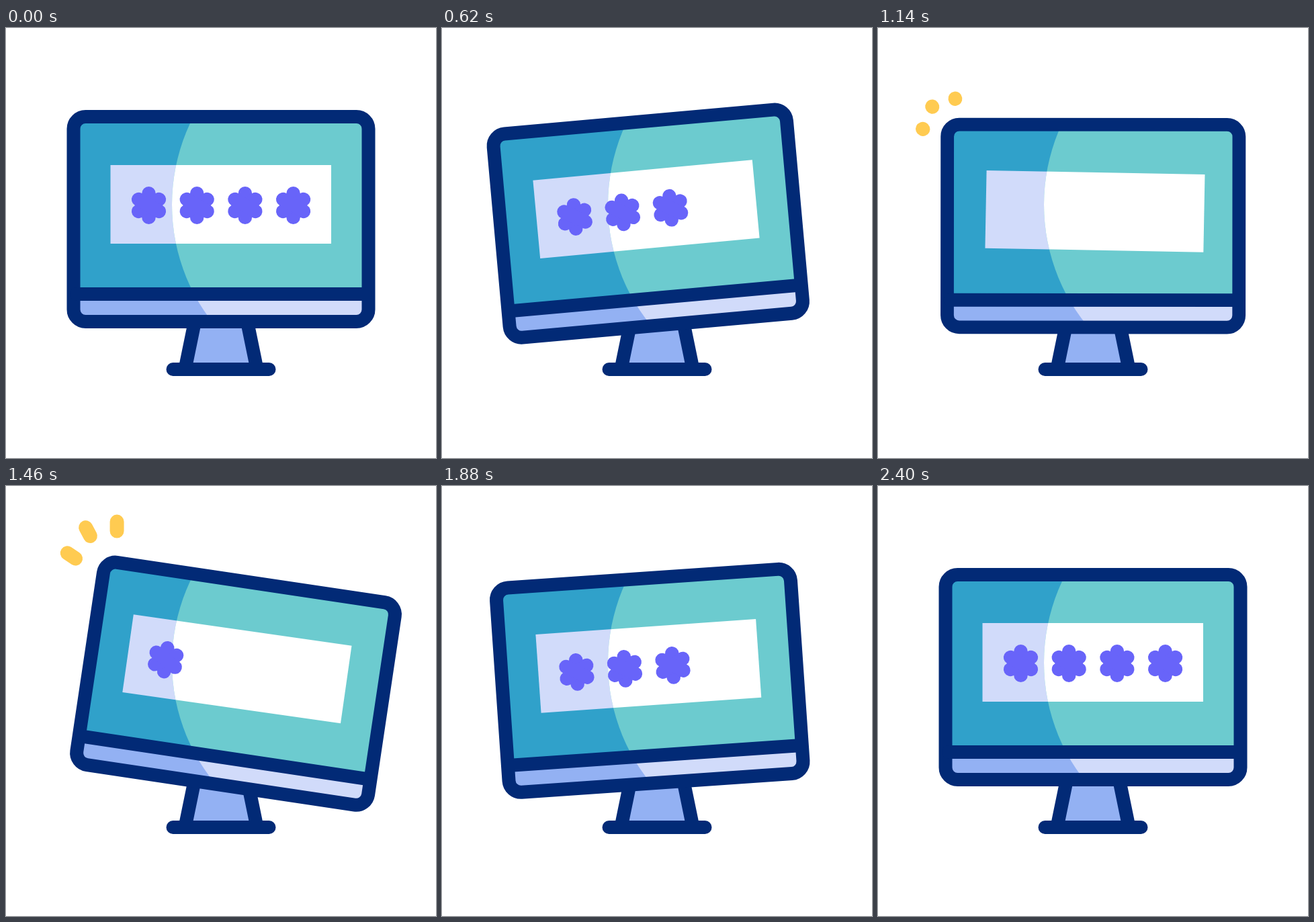
Recreate the animation shown at these times as an HTML page with a canvas. Size 640x640 px, loop 3000 ms.

```html
<!DOCTYPE html>
<html lang="en">
<head>
<meta charset="utf-8">
<title>Password monitor</title>
<style>
  html, body { margin: 0; width: 100%; height: 100%; overflow: hidden; background: #fff; }
  canvas { display: block; width: 640px; height: 640px; }
</style>
</head>
<body>
<canvas id="stage" width="640" height="640"></canvas>
<script>
const ctx = document.getElementById('stage').getContext('2d');
const LOOP = 3000, STEP = 20;
const NAVY = '#022a76', VIOLET = '#6864f9', YELLOW = '#ffcb51', STAND = '#93b1f3';
const SHADED = { screen: '#30a1ca', strip: '#93b1f3', field: '#d1dbfa' };
const LIT = { screen: '#6ccbcf', strip: '#d1dbfa', field: '#ffffff' };

// Poses of the monitor: time, tilt in degrees, centre
const POSES = [
  [200, 0, 320, 284.5],
  [900, -7.9, 299.6, 294.8],
  [1400, 9, 343.4, 294.4],
  [1900, -4, 309.1, 289.8],
  [2400, 0, 320, 284.5]
];
const HIDE_TIMES = [500, 650, 800, 950];
const SHOW_TIMES = [1400, 1600, 1800, 2000];

// Sparks: start point and outward vector, relative to the monitor's centre
const SPARKS = [
  [-256, -145.5, -21.6, -10.2],
  [-242, -179, -13.9, -18.7],
  [-207.6, -191, -3.3, -22.2]
];

const ease = (t, from, to) => {
  const p = Math.min(1, Math.max(0, (t - from) / (to - from)));
  return p * p * (3 - 2 * p);
};

// Points travel in straight lines between poses, so blend the matrices.
// The field reaches each pose slightly before the monitor (lead).
function poseAt(t, lead) {
  const matrix = ([, angle, x, y]) => {
    const a = angle * Math.PI / 180, c = Math.cos(a), s = Math.sin(a);
    return [c, s, -s, c, x, y];
  };
  const time = i => POSES[i][0] - (i ? lead : 0);
  let i = 0;
  while (i < POSES.length - 2 && t >= time(i + 1)) i++;
  const u = ease(t, time(i), time(i + 1));
  const next = matrix(POSES[i + 1]);
  return matrix(POSES[i]).map((v, k) => v + (next[k] - v) * u);
}

function withPose(pose, draw) {
  ctx.save();
  ctx.transform(...pose);
  draw();
  ctx.restore();
}

function fillRect(color, x, y, w, h) {
  ctx.fillStyle = color;
  ctx.fillRect(x, y, w, h);
}

function line(color, width, ...points) {
  ctx.strokeStyle = color;
  ctx.lineWidth = width;
  ctx.beginPath();
  for (let i = 0; i < points.length; i += 2) ctx.lineTo(points[i], points[i + 1]);
  ctx.stroke();
}

function drawStand() {
  ctx.fillStyle = STAND;
  ctx.beginPath();
  for (const [x, y] of [[281, 437], [359, 437], [373.6, 508], [266.4, 508]]) ctx.lineTo(x, y);
  ctx.fill();
  line(NAVY, 20, 266.4, 508, 281, 437, 359, 437, 373.6, 508);
  line(NAVY, 20, 248.5, 508, 391.5, 508);
}

function drawPanels(colors, body, field) {
  withPose(body, () => {
    fillRect(colors.screen, -215, -148, 430, 262);
    fillRect(colors.strip, -215, 112, 430, 36);
  });
  withPose(field, () => fillRect(colors.field, -164.5, -80.5, 328.5, 117));
}

function drawFrame() {
  ctx.strokeStyle = NAVY;
  ctx.lineWidth = 20;
  ctx.beginPath();
  ctx.roundRect(-219.5, -152.5, 439, 305, 18);
  ctx.stroke();
  line(NAVY, 20, -215, 111.5, 215, 111.5);
}

function drawAsterisk(x, y) {
  for (let k = 0; k < 3; k++) {
    const a = Math.PI / 2 + k * Math.PI / 3;
    const dx = 17.7 * Math.cos(a), dy = 17.7 * Math.sin(a);
    line(VIOLET, 20.6, x - dx, y - dy, x + dx, y + dy);
  }
}

function drawSparks(t) {
  const head = ease(t, 1100, 1500), tail = ease(t, 1300, 1700);
  if (head <= tail) return;
  for (const [x, y, dx, dy] of SPARKS) {
    line(YELLOW, 21, x + dx * tail, y + dy * tail, x + dx * head, y + dy * head);
  }
}

function render(t) {
  const body = poseAt(t, 0), field = poseAt(t, 20);
  const passed = times => times.filter(time => t >= time).length;
  const count = 4 - passed(HIDE_TIMES) + passed(SHOW_TIMES);

  fillRect('#fff', 0, 0, 640, 640);
  ctx.lineCap = ctx.lineJoin = 'round';
  drawStand();
  drawPanels(SHADED, body, field);

  // The light is a fixed circle that the monitor moves under
  ctx.save();
  ctx.beginPath();
  ctx.arc(531.6, 263, 284.6, 0, 2 * Math.PI);
  ctx.clip();
  drawPanels(LIT, body, field);
  ctx.restore();

  withPose(field, () => {
    for (let i = 0; i < count; i++) drawAsterisk(-107.5 + 71.7 * i, -20.5);
  });
  withPose(body, () => {
    drawFrame();
    drawSparks(t);
  });
}

function tick() {
  render(Math.floor(performance.now() % LOOP / STEP) * STEP);
  requestAnimationFrame(tick);
}
tick();
</script>
</body>
</html>
```
